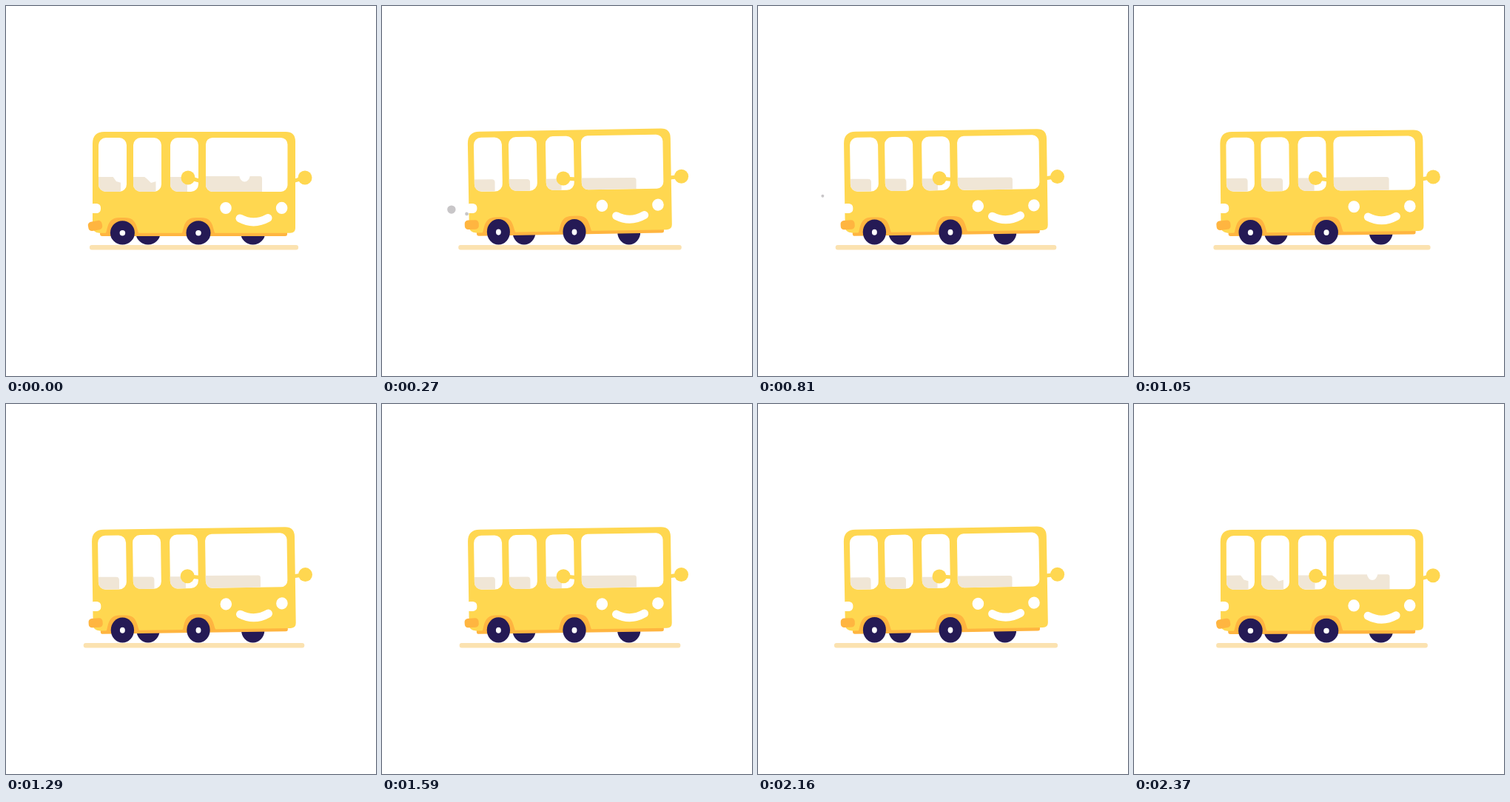
These frames come from a looping animation (500 px wide and 500 px high, 2.4 s). An HTML page:

```html
<!DOCTYPE html>
<html lang="en">
<head>
<meta charset="utf-8">
<title>Happy bus</title>
<style>
html, body { margin: 0; width: 100%; height: 100%; overflow: hidden; background: #fff; }
svg { display: block; width: 100%; height: 100%; }
</style>
</head>
<body>
<svg viewBox="0 0 500 500">
  <defs>
    <clipPath id="panes">
      <rect x="125" y="178" width="38" height="73" rx="10"/>
      <rect x="172" y="178" width="38" height="73" rx="10"/>
      <rect x="222" y="178" width="38" height="73" rx="10"/>
      <rect x="270" y="178" width="110.5" height="73" rx="9"/>
    </clipPath>
  </defs>
  <rect id="ground" y="323" height="6.6" rx="3" fill="#fbe2b0"/>
  <g id="smoke" fill="#c8c6c8"></g>
  <g id="far" fill="#251a55"></g>
  <g id="bus">
    <path d="M127 305H380V308.5Q380 311 377 311H130Q127 311 127 308Z" fill="#ffb540"/>
    <path d="M133 170H378Q391 170 391 183V300Q391 306.7 384 306.7H126Q117 306 117 298V186Q117 170 133 170Z" fill="#ffd750"/>
    <g fill="#ffb540">
      <path id="arch" d="M134 308C138 304 135 286 153 286H161C178 286 176 302 180 308Z"/>
      <use href="#arch" x="103"/>
    </g>
    <g fill="#fff">
      <rect x="125" y="178" width="38" height="73" rx="10"/>
      <rect x="172" y="178" width="38" height="73" rx="10"/>
      <rect x="222" y="178" width="38" height="73" rx="10"/>
      <rect x="270" y="178" width="110.5" height="73" rx="9"/>
      <rect x="113" y="267" width="15" height="13" rx="5.5"/>
      <ellipse cx="297" cy="273" rx="7.8" ry="8.1"/>
      <ellipse cx="372.6" cy="273" rx="7.8" ry="8.1"/>
    </g>
    <path d="M316 287Q335 297 354 286.5" fill="none" stroke="#fff" stroke-width="11" stroke-linecap="round"/>
    <g clip-path="url(#panes)">
      <g id="seats" fill="#f0e6d6">
        <rect x="105" y="231" width="50" height="40" rx="4"/>
        <rect x="165" y="231" width="37.5" height="40" rx="4"/>
        <rect x="215" y="231" width="30" height="40" rx="4"/>
        <rect x="262" y="230" width="84" height="40" rx="3"/>
        <g id="dips" fill="#fff">
          <path d="M144 230L149 237L156 239V230Z"/>
          <path d="M186 230L191 234L196 239L203 237V230Z"/>
          <path d="M315 229Q317 237.5 322.5 237.5T330 229Z"/>
        </g>
      </g>
    </g>
  </g>
  <rect id="pipe" x="-9.5" y="-6.2" width="19" height="12.4" rx="4.5" fill="#ffb540"/>
  <g id="mirrors" fill="#ffd750" stroke="#ffd750"></g>
  <g id="near"></g>
</svg>
<script>
const LOOP = 2400, BOUNCE = 480;
const $ = id => document.getElementById(id);
const set = (el, attrs) => { for (const k in attrs) el.setAttribute(k, attrs[k]); };
const add = (parent, tag, attrs = {}) => {
  const el = document.createElementNS('http://www.w3.org/2000/svg', tag);
  set(el, attrs);
  parent.appendChild(el);
  return el;
};
const mix = (a, b, k) => a + (b - a) * k;

const farWheels = [192, 333.7].map(cx => add($('far'), 'ellipse', { cx }));
const wheels = [157.4, 260].map(cx => ({
  tyre: add($('near'), 'ellipse', { cx, fill: '#251a55' }),
  hub: add($('near'), 'ellipse', { cx, fill: '#fff' })
}));

// Pairs hold the resting and the fully tilted value.
const mirrors = [
  { x: [246, 245], y: [232, 233], ax: [263, 263], ay: [236.5, 234] },
  { x: [404, 404.6], y: [232, 230.3], ax: [389, 389], ay: [236.5, 232] }
].map(m => ({
  ...m,
  stalk: add($('mirrors'), 'line', { 'stroke-width': 5 }),
  ball: add($('mirrors'), 'circle', { r: 9.5, stroke: 'none' })
}));

const puffs = [
  { start: 60, life: 600, x: 72, y: 267 },
  { start: 225, life: 650, x: 87, y: 256.5 }
].map(p => ({ ...p, el: add($('smoke'), 'circle') }));

function drawPuff(p, t) {
  const age = (t - p.start) / p.life;
  const on = age > 0 && age < 1;
  const k = on ? Math.sin(age * Math.PI / 2) : 0;
  set(p.el, {
    cx: mix(118, p.x, k),
    cy: mix(284, p.y, k),
    r: on ? 5.7 * Math.min(1, age * 6, (1 - age) * 3.5) : 0
  });
}

function draw(t) {
  const e = Math.abs(Math.sin(Math.PI * t / BOUNCE));
  const half = mix(141, 151, e);
  set($('ground'), { x: 254 - half, width: half * 2 });

  set($('bus'), { transform: `rotate(${-e} 120 250)` });
  // Seats sink against the rising body.
  set($('seats'), { transform: `rotate(${e} 120 250) translate(${-2.4 * e} ${3.5 * e}) rotate(${-0.4 * e} 120 250)` });
  set($('dips'), { opacity: e < 0.5 ? 1 : 0 });
  set($('pipe'), { transform: `translate(${mix(120.5, 121.3, e)} ${mix(297, 295.6, e)}) rotate(${mix(-11, -2, e)})` });

  const cy = mix(306.4, 305.3, e), rx = mix(16.5, 15.5, e), ry = mix(16.2, 17.3, e);
  farWheels.forEach(w => set(w, { cy, rx, ry }));
  wheels.forEach(({ tyre, hub }) => {
    set(tyre, { cy, rx, ry });
    set(hub, { cy: cy + 0.3, rx: mix(3.8, 3.4, e), ry: mix(3.7, 4.1, e) });
  });

  mirrors.forEach(m => {
    const [x, y, ax, ay] = [m.x, m.y, m.ax, m.ay].map(p => mix(p[0], p[1], e));
    set(m.ball, { cx: x, cy: y });
    set(m.stalk, { x1: x, y1: y, x2: ax, y2: ay });
  });

  puffs.forEach(p => drawPuff(p, t));
}

const begin = performance.now();
function tick() {
  draw((performance.now() - begin) % LOOP);
  requestAnimationFrame(tick);
}
tick();
</script>
</body>
</html>
```
